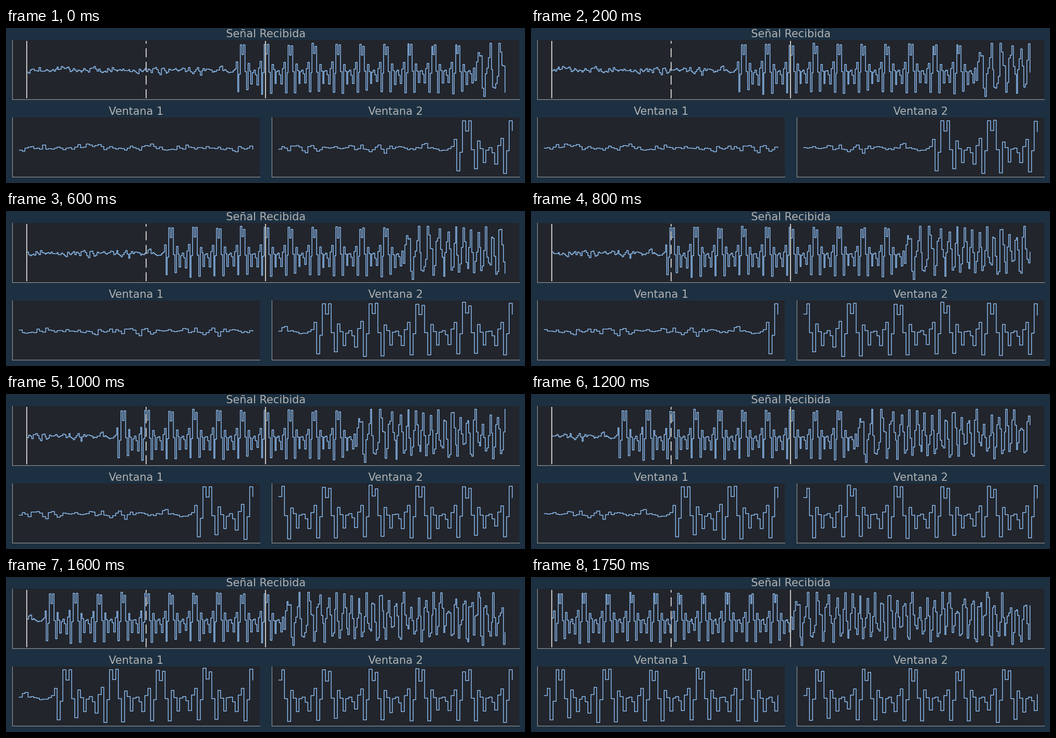
A matplotlib script that plays this animation: 1000 px wide and 300 px high, repeating every 2150 ms.

```python
import numpy as np
import matplotlib.pyplot as plt
from matplotlib.animation import FuncAnimation

W, H, DPI = 1000, 300, 100
BACK, PANEL, EDGE, TEXT, WAVE = "#1c3041", "#22252c", "#9a9a9a", "#b1b1b1", "#93c7ff"
FRAMES, HOP, LAST = 43, 4, 139       # samples per frame, final offset
WIN, PITCH = 80, 16
rng = np.random.default_rng(11)


def quiet(n):
    """Low background noise, slightly smoothed."""
    noise = rng.normal(0, 4.2, n + 1)
    return np.clip(0.8 * noise[1:] + 0.35 * noise[:-1] - 0.5, -10, 10)


def voiced(cycles):
    """One pitch period repeated with small variations."""
    period = np.array([-17, 45, 5, -53, -33, -52, 3, 45,
                       -13, 1, 27, 3, 0, 9, 26, -4])
    wobble = rng.normal(0, 0.045, (cycles, PITCH))
    return (period * (1 + wobble) + rng.normal(0, 0.8, wobble.shape)).ravel()


def rough(n):
    """Loud oscillation that quickens, with a sharper peak per pitch period."""
    i = np.arange(n)
    phase = np.cumsum(2 * np.pi / np.interp(i, [15, 35], [7.5, 5]))
    y = -2 - 37 * np.cos(phase - phase[2]) + rng.normal(0, 13, n)
    y[::PITCH] -= 12
    return np.clip(y, -56, 54)


signal = np.concatenate([quiet(140), voiced(10), rough(160)])

fig = plt.figure(figsize=(W / DPI, H / DPI), dpi=DPI, facecolor=BACK)


def panel(title, left, right, top, bottom):
    """Axes whose data units are stage pixels."""
    ax = fig.add_axes([left / W, 1 - bottom / H,
                       (right - left) / W, (bottom - top) / H], facecolor=PANEL)
    ax.set(xlim=(left, right), ylim=(bottom, top), xticks=[], yticks=[])
    ax.spines[["top", "right"]].set_visible(False)
    ax.spines[["left", "bottom"]].set(color=EDGE, linewidth=0.8)
    ax.set_title(title, fontsize=15, color=TEXT, pad=3, family="DejaVu Sans")
    return ax


def trace(ax, x0, x1, count):
    x = np.linspace(x0, x1, count + 1)
    line, = ax.plot(x, x * 0, color=WAVE, lw=1, drawstyle="steps-post")
    return line


full = panel("Señal Recibida", 11.9, 988.5, 22.5, 138)
first = panel("Ventana 1", 11.9, 488.8, 172.5, 288)
second = panel("Ventana 2", 511.9, 988.8, 172.5, 288)

# line, first sample, sample count, zero level, gain
traces = [
    (trace(full, 40, 960.5, 4 * WIN), 0, 4 * WIN, 81.5, 0.94),
    (trace(first, 25, 475, WIN), 0, WIN, 232, 1),
    (trace(second, 525, 975, WIN), WIN, WIN, 232, 1),
]

for x, style in [(39.9, "-"), (269.9, (0, (8.4, 4.3))), (499.9, "-")]:
    full.plot([x, x], [135.5, 25], color="#c4c4c0", lw=1.5, ls=style,
              solid_capstyle="butt", zorder=3)


def draw(frame):
    offset = min(frame * HOP, LAST)
    for line, start, count, zero, gain in traces:
        a = offset + start
        line.set_ydata(zero + gain * signal[a:a + count + 1])
    return [t[0] for t in traces]


anim = FuncAnimation(fig, draw, frames=FRAMES, interval=50,
                     init_func=lambda: draw(0), repeat=True, repeat_delay=0)
plt.show()
```
